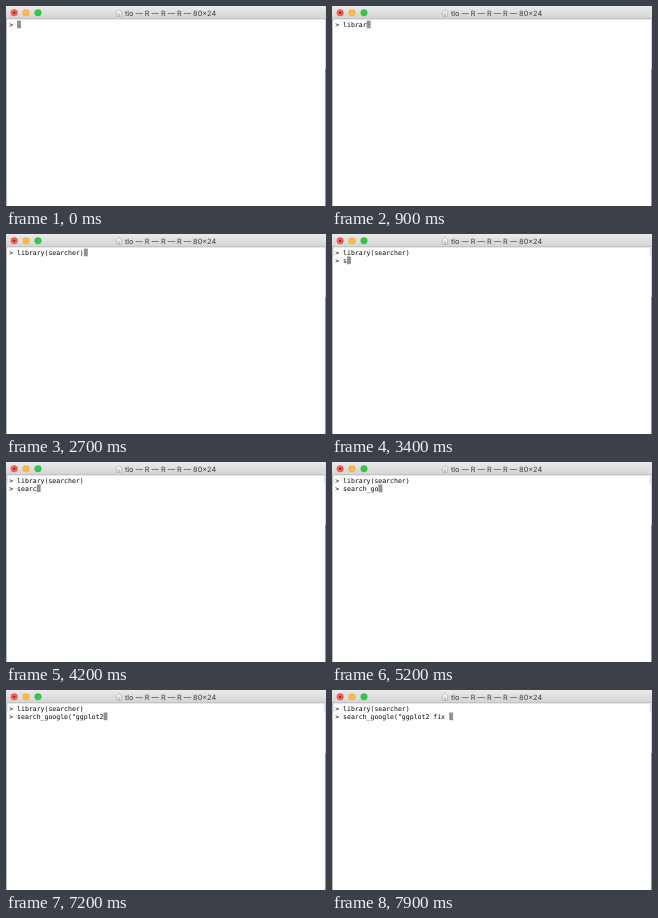
Write an HTML page that moves like this. It is 320 by 200 pixels and loops after 8000 ms.

```html
<!DOCTYPE html>
<html lang="en">
<head>
<meta charset="utf-8">
<title>Terminal</title>
<style>
  html, body { margin: 0; width: 100%; height: 100%; overflow: hidden; background: #fff; }
  svg { display: block; width: 320px; height: 200px; }
  text { white-space: pre; text-rendering: geometricPrecision; }
  .title { font: 7.3px Inter, Roboto, sans-serif; fill: #3c3c3c; text-anchor: middle; }
  .code { font: 6.53px "DejaVu Sans Mono", "Liberation Mono", monospace; fill: #000; }
</style>
</head>
<body>
<svg viewBox="0 0 320 200">
  <defs>
    <linearGradient id="bar" x2="0" y2="1">
      <stop offset="0" stop-color="#ebebeb"/>
      <stop offset="1" stop-color="#d3d3d3"/>
    </linearGradient>
  </defs>
  <rect width="320" height="200" fill="#fff"/>
  <rect width="320" height="13" fill="url(#bar)"/>
  <rect y="12.6" width="320" height=".7" fill="#adadad"/>
  <rect y="13" width=".6" height="187" fill="#8f8f8f"/>
  <rect x="319.4" y="13" width=".6" height="50" fill="#b5b5b5"/>
  <rect x="319.2" y="63" width=".8" height="137" fill="#777"/>

  <g stroke-width=".4">
    <circle cx="8.2" cy="6.8" r="3.3" fill="#fc5b57" stroke="#df4744"/>
    <circle cx="8.2" cy="6.8" r="1.1" fill="#8c1a14"/>
    <circle cx="20" cy="6.8" r="3.3" fill="#fdbc40" stroke="#de9f34"/>
    <circle cx="32" cy="6.8" r="3.3" fill="#34c84a" stroke="#27aa35"/>
  </g>
  <path d="M109.3 7 113 3.5l3.7 3.5M110.4 6.4v4h5.2v-4M112.2 10.4v-2.5h1.6v2.5"
        fill="#f4f4f4" stroke="#a5a5a5" stroke-width=".6"/>
  <text class="title" x="164.5" y="9.6">tlo — R — R — R — 80×24</text>

  <path id="marks" d="M2.4 15.2H1.3v6.4h1.1M317.4 15.2h1.1v6.4h-1.1"
        fill="none" stroke="#ccc" stroke-width=".6"/>
  <rect id="cursor" width="3.93" height="7.7" fill="#929292"/>
  <text class="code" id="row0" x="3.2" y="20.7"></text>
  <text class="code" id="row1" x="3.2" y="28.6"></text>
</svg>
<script>
const LOOP = 8000, ENTER = 2900, CHAR = 3.93, ROW = 7.9;
const $ = id => document.getElementById(id);

// Time of each keystroke, in units of 100 ms
const rows = [
  { text: 'library(searcher)', start: 0,
    keys: [3, 5, 5, 7, 8, 9, 10, 12, 14, 15, 16, 18, 20, 21, 23, 24, 27] },
  { text: 'search_google("ggplot2 fix ', start: ENTER,
    keys: [34, 38, 39, 40, 42, 43, 46, 50, 52, 53, 54, 55, 56, 58, 60,
           66, 67, 67, 68, 70, 71, 72, 74, 75, 76, 77, 79] }
];

function draw(now) {
  const t = now % LOOP;
  rows.forEach(({ text, start, keys }, i) => {
    const on = t >= start;
    const typed = keys.filter(k => k * 100 <= t).length;
    $('row' + i).textContent = on ? '> ' + text.slice(0, typed) : '';
    if (on) {
      $('cursor').setAttribute('x', 3.2 + CHAR * (typed + 2));
      $('cursor').setAttribute('y', 14.6 + ROW * i);
    }
  });
  $('marks').style.display = t >= ENTER ? '' : 'none';
}

let begin;
function tick(now) {
  begin ??= now;
  draw(now - begin);
  requestAnimationFrame(tick);
}
draw(0);
requestAnimationFrame(tick);
</script>
</body>
</html>
```
